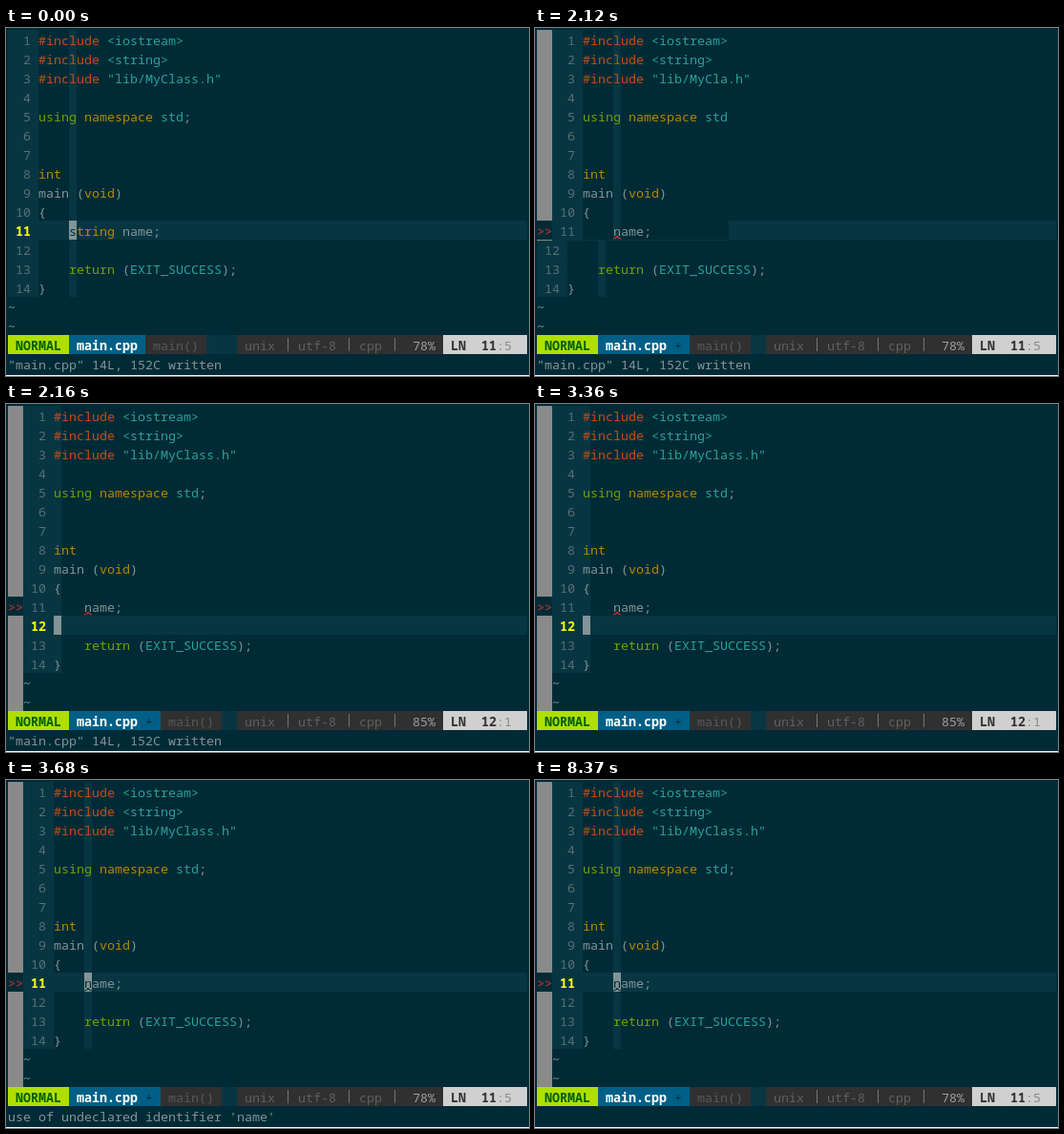
An HTML page for the animation above (9160 ms loop, 548x365 px).

```html
<!DOCTYPE html>
<html lang="en">
<head>
<meta charset="utf-8">
<title>Editor session</title>
<style>
  html, body { margin: 0; width: 100%; height: 100%; overflow: hidden; background: #002b36; }
  svg { display: block; width: 548px; height: 365px; }
  text { font: 13.3333px "Noto Sans Mono", "DejaVu Sans Mono", monospace; white-space: pre; }
  .bold { font-weight: 700; }
</style>
</head>
<body>
<svg id="stage" viewBox="0 0 548 365" xmlns="http://www.w3.org/2000/svg"></svg>
<script>
const NS = "http://www.w3.org/2000/svg";
const stage = document.getElementById("stage");
const CW = 8, RH = 20, PAD = 2, RIGHT = 546, LOOP = 9160;
const C = {
  bg: "#002b36", shade: "#073642", fg: "#839496", dim: "#586e75", sign: "#8a8a8a",
  orange: "#cb4b16", cyan: "#2aa198", green: "#719e07", gold: "#b58900",
  red: "#dc322f", yellow: "#ffff00"
};

const inc = name => [["#include ", C.orange], [name, C.cyan]];
const code = [
  inc("<iostream>"),
  inc("<string>"),
  inc('"lib/MyClass.h"'),
  [],
  [["using ", C.green], ["namespace ", C.gold], ["std", C.cyan], [";", C.fg]],
  [],
  [],
  [["int", C.gold]],
  [["main (", C.fg], ["void", C.gold], [")", C.fg]],
  [["{", C.fg]],
  [["    ", C.fg], ["name;", C.fg]],
  [],
  [["    ", C.fg], ["return ", C.green], ["(", C.fg], ["EXIT_SUCCESS", C.cyan], [");", C.fg]],
  [["}", C.fg]]
];
const typed = { 11: [["    ", C.fg], ["string", C.gold], [" name;", C.fg]] };
const partial = {
  3: inc('"lib/MyCla.h"'),
  5: code[4].slice(0, 3)
};

let layer;
const px = col => PAD + col * CW;
const py = row => PAD + row * RH;

function add(tag, attrs) {
  const el = document.createElementNS(NS, tag);
  for (const k in attrs) el.setAttribute(k, attrs[k]);
  layer.appendChild(el);
  return el;
}

function rect(x, y, width, height, fill) {
  add("rect", { x, y, width, height, fill });
}

function write(col, row, str, fill, bold) {
  if (!str.trim()) return;
  const lead = str.length - str.trimStart().length;
  const el = add("text", { x: px(col + lead), y: py(row) + 16, fill });
  if (bold) el.setAttribute("class", "bold");
  el.textContent = str.trim();
}

function block(col, row, ch, ink) {
  rect(px(col), py(row), CW, RH, C.fg);
  write(col, row, ch, ink);
}

function curl(col, row, stroke) {
  const x = px(col), y = py(row) + 19;
  add("path", { d: `M${x} ${y}q2 0 4-2.5q2 2.5 4 2.5`, fill: "none", stroke, "stroke-width": 1.2 });
}

// Draws file lines first..last, with the sign column when s.signs is set.
function lines(s, first, last) {
  const side = s.signs ? 2 : 0, start = side + 4;
  for (let n = first; n <= last; n++) {
    const r = n - 1 - (s.top || 0), y = py(r), here = n === s.row;
    if (s.signs && n !== 11) rect(PAD, y, 2 * CW, RH, C.sign);
    if (n > 14) {
      write(side, r, "~", C.fg);
      continue;
    }
    rect(px(side), y, here ? RIGHT - px(side) : 4 * CW, RH, C.shade);
    rect(px(start + s.col - 1), y, CW, RH, C.shade);
    write(side, r, String(n).padStart(3), here ? C.yellow : C.dim, here);
    let col = start;
    for (const [str, fill] of (s.edit && s.edit[n]) || code[n - 1]) {
      write(col, r, str, fill);
      col += str.length;
    }
    if (s.signs && n === 11) {
      write(0, r, ">>", C.red);
      curl(start + 4, r, C.red);
    }
  }
}

function cursor(s) {
  const start = s.signs ? 6 : 4, r = s.row - 1;
  const full = ((s.edit && s.edit[s.row]) || code[r]).map(p => p[0]).join("");
  block(start + s.col - 1, r, full[s.col - 1] || " ", C.bg);
  if (s.signs && s.row === 11) curl(start + 4, r, C.bg);
}

function status(s, row) {
  const y = py(row), end = s.mod ? 20 : 18;
  const bar = (a, b, fill) => rect(px(a), y, (b - a) * CW, RH, fill);
  bar(0, 8, "#afdf00");
  bar(8, end, "#005f87");
  bar(end, end + 8, "#303030");
  bar(end + 8, 30, C.shade);
  bar(30, 57, "#303030");
  bar(57, 68, "#d0d0d0");
  write(1, row, "NORMAL", "#005f00", true);
  write(9, row, "main.cpp", "#ffffff", true);
  if (s.mod) write(18, row, "+", C.bg);
  write(end + 1, row, "main()", "#585858");
  write(31, row, "unix", "#606060");
  write(38, row, "utf-8", "#606060");
  write(46, row, "cpp", "#606060");
  for (const c of [36, 44, 50]) rect(px(c) + 5, y + 3, 1, 14, "#767676");
  write(53, row, Math.floor(s.row / 14 * 100) + "%", "#9e9e9e");
  write(58, row, "LN", "#303030", true);
  write(62, row, String(s.row), "#303030", true);
  write(64, row, ":" + s.col, "#8a8a8a");
}

function editor(s) {
  lines(s, 1, 16);
  cursor(s);
  status(s, 16);
  write(0, 17, s.msg || "", C.fg);
}

// Redraw caught halfway: the upper rows have moved, the lower ones have not.
function torn() {
  lines({ col: 5, signs: true, edit: partial }, 1, 11);
  rect(203, py(10), RIGHT - 203, RH, C.shade);
  lines({ col: 5 }, 12, 16);
  rect(PAD, py(11), 16, 1, C.sign);
  rect(18, py(11), 185, 1, C.shade);
  status({ row: 11, col: 5, mod: true }, 16);
  write(0, 17, saved, C.fg);
}

function prompt() {
  const s = { row: 11, col: 5, signs: true, mod: true, top: 2 };
  lines(s, 3, 16);
  status(s, 14);
  write(0, 15, "/data/workplace/combined_sample_tree/main.cpp:11:5: error: use of un", C.fg);
  write(0, 16, "declared identifier 'name'", C.fg);
  write(0, 17, "Press ENTER or type command to continue", C.cyan);
  block(39, 17, " ", C.bg);
}

const saved = '"main.cpp" 14L, 152C written';
const hint = "use of undeclared identifier 'name'";
const at = (row, col, msg) => () => editor({ row, col, msg, signs: true, mod: true });

const steps = [
  [0, () => editor({ row: 11, col: 5, msg: saved, edit: typed })],
  [1210, () => editor({ row: 11, col: 5, msg: saved, mod: true })],
  [2120, torn],
  [2160, at(12, 1, saved)],
  [3040, at(12, 1)],
  [3080, at(13, 5)],
  [3320, at(12, 1)],
  [3640, at(11, 5)],
  [3680, at(11, 5, hint)],
  [6960, prompt],
  [8370, at(11, 5)]
];

const screens = steps.map(([, draw]) => {
  layer = document.createElementNS(NS, "g");
  layer.style.display = "none";
  rect(0, 0, 548, 365, C.bg);
  draw();
  rect(0, 364, 548, 1, "#f4f6f6");
  stage.appendChild(layer);
  return layer;
});

let shown = -1;
const began = performance.now();
function tick() {
  const t = (performance.now() - began) % LOOP;
  let i = steps.length - 1;
  while (steps[i][0] > t) i--;
  if (i !== shown) {
    if (shown >= 0) screens[shown].style.display = "none";
    screens[i].style.display = "";
    shown = i;
  }
  requestAnimationFrame(tick);
}
tick();
</script>
</body>
</html>
```
